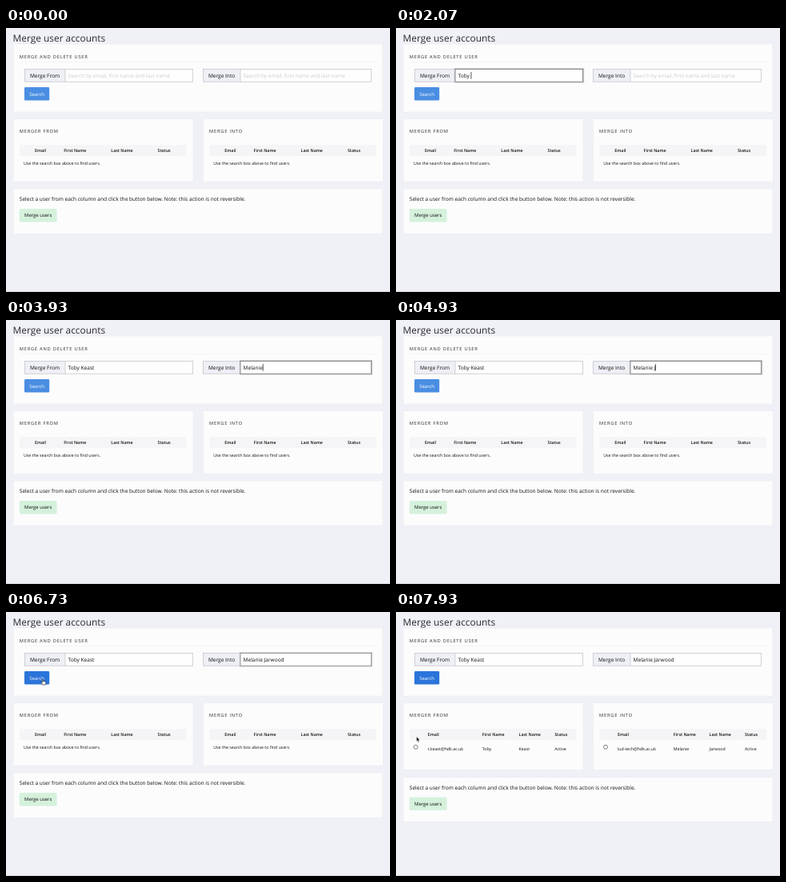
Write an HTML page that moves like this. It is 480x330 px and loops after 8 s.

```html
<!DOCTYPE html>
<html lang="en">
<head>
<meta charset="utf-8">
<title>Merge user accounts</title>
<style>
  html, body { margin: 0; width: 100%; height: 100%; overflow: hidden; background: #f0f1f7; }
  svg { display: block; width: 480px; height: 330px; }
  text { font-family: "Open Sans", "Noto Sans", sans-serif; fill: #111; white-space: pre; text-rendering: geometricPrecision; }
  .title { font-size: 11.9px; fill: #2b2b30; }
  .head { font-size: 5.73px; letter-spacing: .77px; fill: #2b2b30; }
  .field, .body { font-size: 6.55px; }
  .hint { font-size: 6.55px; fill: #cbcbcd; }
  .th { font-size: 5.3px; font-weight: 600; }
  .td { font-size: 5.25px; }
  .btn { font-size: 5.95px; text-anchor: middle; }
</style>
</head>
<body>
<svg id="stage" viewBox="0 0 480 330" xmlns="http://www.w3.org/2000/svg"></svg>
<script>
const LOOP = 8000;
const INK = '#111';
const stage = document.getElementById('stage');

const rect = (x, y, w, h, fill, extra = '') =>
  `<rect x="${x}" y="${y}" width="${w}" height="${h}" fill="${fill}" ${extra}/>`;
const text = (x, y, cls, str, extra = '') =>
  `<text x="${x}" y="${y}" class="${cls}" ${extra}>${str}</text>`;
const card = (x, y, w, h, extra = '') =>
  rect(x, y, w, h, '#fcfcfd', `stroke="#e9eaf0" stroke-width=".6" ${extra}`);

// Labelled input whose glow, hint, value and caret are updated later
function field(id, x, split, right, label) {
  const border = 'stroke="#c6c7cb" stroke-width=".8"';
  return rect(x + .4, 51.4, split - x, 15.8, '#eff0f6', border) +
    text(x + 6.9, 61.7, 'field', label) +
    rect(split, 51.2, right - split, 16.2, 'none', `id="${id}Glow" stroke="#b4b5ba" stroke-width="2.4"`) +
    rect(split, 51.4, right - split - .4, 15.8, '#fefefe', `id="${id}Box" stroke-width=".8"`) +
    text(split + 3.6, 61.7, 'hint', 'Search by email, first name and last name', `id="${id}Hint"`) +
    text(split + 3.6, 61.7, 'field', '', `id="${id}Text"`) +
    rect(0, 55, .7, 8.6, INK, `id="${id}Caret"`);
}

const cells = (xs, y, cls, words) => words.map((w, i) => text(xs[i], y, cls, w)).join('');
const titles = ['Email', 'First Name', 'Last Name', 'Status'];

function emptyTable(dx) {
  return cells([36, 72.3, 131.3, 189.6].map(x => x + dx), 154.7, 'th', titles) +
    text(22 + dx, 170.8, 'td', 'Use the search box above to find users.');
}
function fullTable(dx, xs, row) {
  return cells(xs, 154.7, 'th', titles) + cells(xs, 173.1, 'td', row) +
    `<circle cx="${24.7 + dx}" cy="168.8" r="2.5" fill="#fff" stroke="#55565a" stroke-width=".75"/>`;
}
const panel = (dx, heading) =>
  card(9 + dx, 113.7, 225, 78.4, 'class="panel"') +
  text(16.8 + dx, 131, 'head', heading) +
  rect(17 + dx, 146, 208.5, 14, '#f5f5f7');

stage.innerHTML =
  rect(0, 0, 480, 330, '#f0f1f7') +
  rect(0, 329, 480, 1, '#d3d4d9') +
  text(8.6, 16.9, 'title', 'Merge user accounts') +
  card(9, 20, 462, 85) +
  text(16.8, 37.6, 'head', 'MERGE AND DELETE USER') +
  rect(17, 42, 446, .6, '#f0f0f3') +
  field('from', 23, 74, 234, 'Merge From') +
  field('into', 246, 293, 457, 'Merge Into') +
  rect(23, 74, 31.2, 16.6, '#4a8ee2', 'rx="1.4" id="search"') +
  text(38.6, 84.5, 'btn', 'Search', 'style="fill:#fff"') +
  panel(0, 'MERGER FROM') + panel(237.3, 'MERGE INTO') +
  `<g id="empty">${emptyTable(0)}${emptyTable(237.3)}</g>` +
  '<g id="full">' +
    fullTable(0, [39.8, 107.7, 153.6, 198.2],
      ['t.keast@hdk.ac.uk', 'Toby', 'Keast', 'Active']) +
    fullTable(237.3, [277, 346.8, 391.6, 436],
      ['lud-tech@hdk.ac.uk', 'Melanie', 'Jarwood', 'Active']) +
  '</g><g id="footer">' +
    card(9, 201, 462, 56) +
    text(16.8, 216.4, 'body', 'Select a user from each column and click the button below. Note: this action is not reversible.') +
    rect(16.8, 226, 46.8, 16.4, '#d5f1dc', 'rx="1.4"') +
    text(40.2, 236.2, 'btn', 'Merge users') +
  '</g>' +
  `<path id="beam" fill="none" stroke="${INK}" stroke-width=".7" d="M-1.3-3.4Q0-3.4 0-2.6Q0-3.4 1.3-3.4M0-2.8V2.8M-1.3 3.4Q0 3.4 0 2.6Q0 3.4 1.3 3.4"/>` +
  `<path id="arrow" fill="${INK}" stroke="#fff" stroke-width=".5" d="M0 0V6.2L1.4 4.9L2.4 7.2L3.5 6.7L2.5 4.5H4.4Z"/>` +
  `<path id="hand" fill="#fff" stroke="${INK}" stroke-width=".65" stroke-linejoin="round" d="M-.7.4Q0-.6.7.4V2.6Q1.4 2.1 1.9 2.8Q2.6 2.4 3 3.1Q3.9 2.9 3.9 3.9V5Q3.8 6.2 3.1 7H-.4Q-1.6 5.4-2.4 4Q-2 3.1-.7 4.2Z"/>`;

const el = {};
stage.querySelectorAll('[id]').forEach(n => el[n.id] = n);
const panels = stage.querySelectorAll('.panel');

const clamp = v => Math.max(0, Math.min(1, v));
const ramp = (t, a, b) => clamp((t - a) / (b - a));
const smooth = p => p * p * (3 - 2 * p);
const blend = (a, b, p) => `rgb(${a.map((v, i) => Math.round(v + (b[i] - v) * p))})`;
const show = (node, on) => node.style.display = on ? '' : 'none';

const pen = document.createElement('canvas').getContext('2d');
function widthOf(str) {
  pen.font = '65.5px "Open Sans", "Noto Sans", sans-serif';
  return pen.measureText(str).width / 10;
}

const FROM = {
  value: 'Toby Keast', x: 77.6, focus: [1050, 1200], blur: [2570, 2730], off: [],
  keys: [1530, 1600, 1730, 1870, 2070, 2130, 2200, 2270, 2330, 2470]
};
const INTO = {
  value: 'Melanie Jarwood', x: 296.6, focus: [2570, 2730], blur: [6700, 6860], off: [[4530, 4730], [5670, 6930]],
  keys: [3270, 3330, 3470, 3530, 3600, 3730, 3930, 4730, 4930, 5000, 5070, 5130, 5270, 5330, 5400]
};

function drawField(id, f, t) {
  const typed = f.value.slice(0, f.keys.filter(k => k <= t).length);
  const focus = ramp(t, ...f.focus) - ramp(t, ...f.blur);
  el[id + 'Text'].textContent = typed;
  show(el[id + 'Hint'], !typed);
  el[id + 'Glow'].setAttribute('opacity', focus * .7);
  el[id + 'Box'].setAttribute('stroke', blend([198, 199, 203], [118, 119, 124], focus));
  const blinkOff = f.off.some(([a, b]) => t >= a && t < b);
  show(el[id + 'Caret'], t >= f.focus[0] && t < f.blur[0] && !blinkOff);
  el[id + 'Caret'].setAttribute('x', f.x + (typed ? widthOf(typed) : -.3));
}

// Pointer moves: start, end, from point, to point; hidden while typing
const moves = [
  [330, 930, [150.5, 261], [106.5, 62.5]],
  [6130, 6600, [77.5, 66.5], [46, 84]],
  [7330, 7930, [46, 84], [25.6, 155.8]]
];

function drawPointer(t) {
  const visible = (t >= 400 && t < 1530) || t >= 5930;
  const move = t < 5930 ? moves[0] : t < 7330 ? moves[1] : moves[2];
  const [a, b, p, q] = move;
  const k = smooth(ramp(t, a, b));
  const x = p[0] + (q[0] - p[0]) * k, y = p[1] + (q[1] - p[1]) * k;
  const onInput = x > 74 && x < 234 && y > 51 && y < 67.5;
  const onButton = x > 23 && x < 54 && y > 74 && y < 90.6;
  const kind = onInput ? 'beam' : onButton ? 'hand' : 'arrow';
  for (const id of ['beam', 'arrow', 'hand']) {
    show(el[id], visible && id === kind);
    el[id].setAttribute('transform', `translate(${x} ${y})`);
  }
}

function draw(t) {
  drawField('from', FROM, t);
  drawField('into', INTO, t);
  el.search.setAttribute('fill', blend([74, 142, 226], [42, 116, 218], ramp(t, 6470, 6700)));

  const loaded = t >= 6930;
  show(el.empty, !loaded);
  show(el.full, loaded);
  panels.forEach(p => p.setAttribute('height', loaded ? 83.8 : 78.4));
  el.footer.setAttribute('transform', `translate(0 ${loaded ? 5.4 : 0})`);
  drawPointer(t);
}

const start = performance.now();
function tick() {
  draw((performance.now() - start) % LOOP);
  requestAnimationFrame(tick);
}
tick();
</script>
</body>
</html>
```
